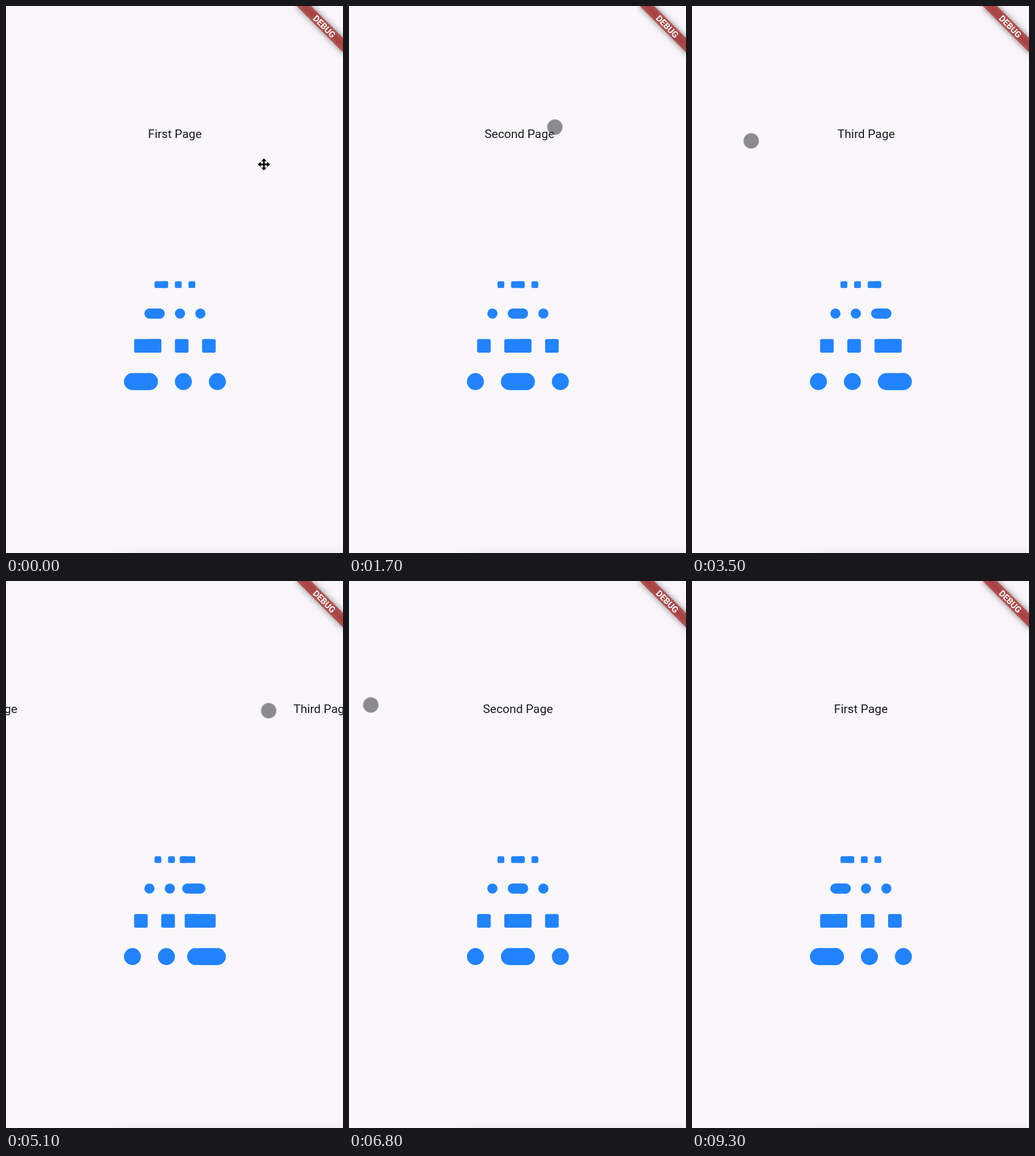
Animation of 588 by 953 pixels, one loop 9400 ms. Source, as an HTML page with a canvas:

```html
<!DOCTYPE html>
<html lang="en">
<head>
<meta charset="utf-8">
<title>Page indicator</title>
<style>
html, body { margin: 0; width: 100%; height: 100%; overflow: hidden; background: #f9f7fa; }
canvas { display: block; }
</style>
</head>
<body>
<canvas id="stage" width="588" height="953"></canvas>
<script>
const ctx = document.getElementById('stage').getContext('2d');
const LOOP = 9400, STEP = 100;
const U = 1.482;              // pixels per layout unit
const PAGE = 400 * U, MID = 294.7;
const TITLES = ['First Page', 'Second Page', 'Third Page'];

// The pointer glides to x, drags the page by pull, then lets go.
const SWIPES = [
  { from: 0, to: 1, pull: 0.54, glide: [0, 450], drag: [500, 1150], x: 430, y: [225, 211], ease: u => u ** 1.6 },
  { from: 1, to: 2, pull: 0.6, glide: [1150, 2000], drag: [2450, 3100], x: 459, y: [211, 235], ease: u => u ** 1.3 },
  { from: 2, to: 1, pull: -0.67, glide: [3500, 4400], drag: [4600, 5660], x: 201.5, y: [226, 226], ease: u => 1 - (1 - u) ** 1.63 },
  { from: 1, to: 0, pull: -0.583, glide: [5660, 6500], drag: [6900, 7600], x: 38, y: [216, 222], ease: u => u }
];

const mix = (a, b, f) => a + (b - a) * f;
const part = ([a, b], t) => Math.min(1, Math.max(0, (t - a) / (b - a)));
const smooth = u => u * u * (3 - 2 * u);

// Overdamped spring: mass 0.5, stiffness 100, damping ratio 1.1
function settle(gap, speed, s) {
  const w = Math.sqrt(200), q = Math.sqrt(0.21);
  const slow = w * (1.1 - q), fast = w * (1.1 + q);
  const a = (fast * gap + speed) / (fast - slow);
  return a * Math.exp(-slow * s) + (gap - a) * Math.exp(-fast * s);
}

const dragged = (s, t) => s.pull * s.ease(part(s.drag, t));

function pageAt(t) {
  const s = SWIPES.findLast(s => t >= s.drag[0]);
  if (!s) return 0;
  const end = s.drag[1];
  if (t <= end) return s.from + dragged(s, t);
  const speed = (dragged(s, end) - dragged(s, end - 1)) * 1000;
  return s.to + settle(s.from + s.pull - s.to, speed, (t - end) / 1000);
}

function touchAt(t) {
  let x = 450, y = 276;
  for (const s of SWIPES) {
    const g = smooth(part(s.glide, t));
    x = mix(x, s.x, g) - dragged(s, t) * PAGE;
    y = mix(mix(y, s.y[0], g), s.y[1], part(s.drag, t));
  }
  return [x, y];
}

// Blurred rectangle: only its shadow lands on the stage
function softRect(x, y, w, h, sigma, color) {
  ctx.save();
  ctx.shadowColor = color;
  ctx.shadowBlur = sigma * 2;
  ctx.shadowOffsetX = 3000;
  ctx.setTransform(new DOMMatrix([1, 0, 0, 1, -3000, 0]).multiply(ctx.getTransform()));
  ctx.fillStyle = '#000';
  ctx.fillRect(x, y, w, h);
  ctx.restore();
}

function drawBanner() {
  const half = 40 * U, h = 12 * U, top = 28 * U;
  ctx.save();
  ctx.translate(591, 0);
  ctx.rotate(Math.PI / 4);
  softRect(-half, top, half * 2, h, 3.96 * U, 'rgba(0,0,0,0.5)');
  ctx.fillStyle = 'rgba(183,28,28,0.627)';
  ctx.fillRect(-half, top, half * 2, h);
  ctx.fillStyle = '#fff';
  ctx.font = `700 ${10.2 * U}px Roboto, sans-serif`;
  ctx.fillText('DEBUG', 0, top + h / 2 + 5.4);
  ctx.restore();
}

function drawTitles(page) {
  ctx.fillStyle = '#1d1b20';
  ctx.font = '20.9px Roboto, sans-serif';
  TITLES.forEach((s, i) => ctx.fillText(s, MID + (i - page) * PAGE, 229.5));
}

function drawRows(page) {
  const on = Math.round(page), low = Math.floor(page);
  const dot = 2 * low + 1 + 2 * (page - low) ** 1.8;
  let y = 479.5;
  ctx.fillStyle = '#2283ff';
  for (let row = 0; row < 4; row++) {
    const s = (8 + 4 * row) * U, r = row % 2 ? s / 2 : 2 * U;
    const bar = (pos, len) => {
      ctx.beginPath();
      ctx.roundRect(MID + (pos - 3) * s, y, len * s, s, r);
      ctx.fill();
    };
    for (let i = 0; i < 3; i++) bar(2 * i + (i > on), i === on ? 2 : 1);
    bar(dot, 1);   // travelling dot
    y += s + 24 * U;
  }
}

function drawMoveIcon(x, y) {
  const arm = new Path2D('M-1.4 0V-5.6H-4.8L0-10.6 4.8-5.6H1.4V0Z');
  ctx.lineJoin = 'round';
  ctx.lineWidth = 2;
  ctx.strokeStyle = '#fff';
  ctx.fillStyle = '#000';
  for (const paint of ['stroke', 'fill']) {
    for (let k = 0; k < 4; k++) {
      ctx.save();
      ctx.translate(x, y);
      ctx.rotate(k * Math.PI / 2);
      ctx[paint](arm);
      ctx.restore();
    }
  }
}

function drawTouch(x, y) {
  ctx.beginPath();
  ctx.arc(x, y, 13.4, 0, Math.PI * 2);
  ctx.fillStyle = 'rgba(30,30,30,0.5)';
  ctx.fill();
  ctx.lineWidth = 1.2;
  ctx.strokeStyle = 'rgba(195,195,195,0.8)';
  ctx.stroke();
}

function draw(t) {
  const page = pageAt(t);
  ctx.textAlign = 'center';
  ctx.fillStyle = '#f9f7fa';
  ctx.fillRect(0, 0, 588, 953);
  softRect(195, 962, 620, 200, 14, 'rgba(0,0,0,0.12)');
  drawTitles(page);
  drawRows(page);
  drawBanner();
  if (t < 100) drawMoveIcon(450, 276);
  else if (t < 7600) drawTouch(...touchAt(t));
}

const start = performance.now();
function tick() {
  const t = (performance.now() - start) % LOOP;
  draw(Math.floor(t / STEP) * STEP);
  requestAnimationFrame(tick);
}
tick();
</script>
</body>
</html>
```
